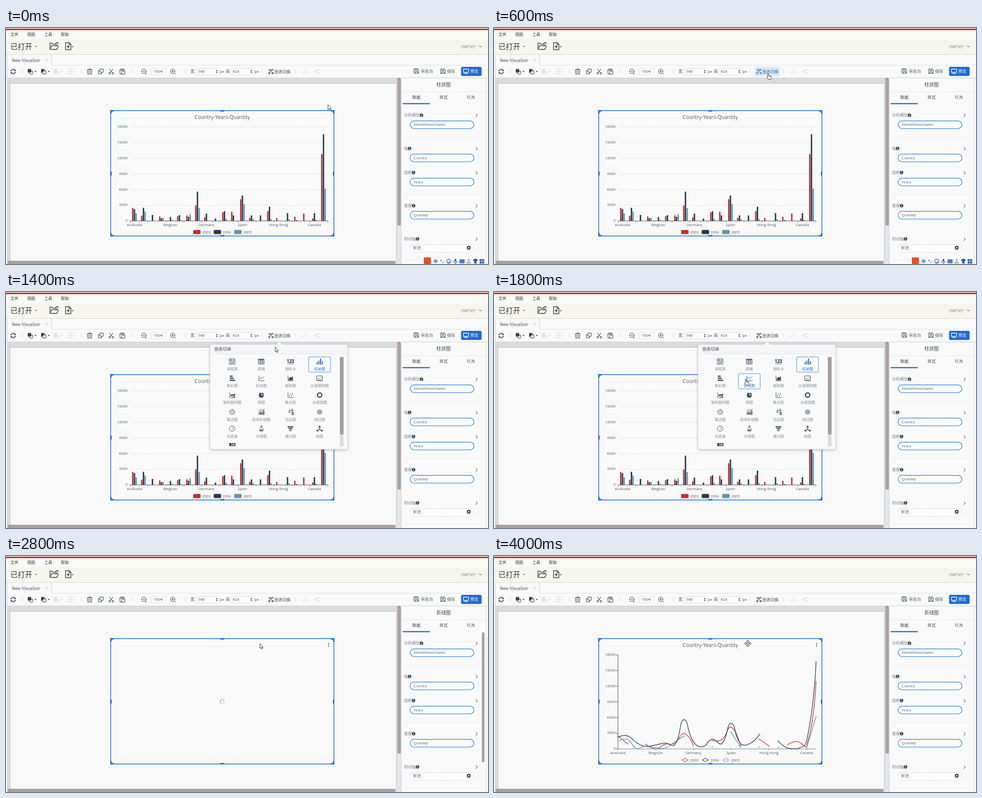
Animation of 976 by 480 pixels, one loop 4.2 s. Source, as an HTML page:

```html
<!DOCTYPE html>
<html lang="zh-CN">
<head>
<meta charset="utf-8">
<title>Visualizer</title>
<style>
html, body { margin: 0; width: 100%; height: 100%; overflow: hidden; background: #f9f9f9; }
svg { display: block; width: 100vw; height: 100vh; }
text { font-family: "Open Sans", "Noto Sans CJK SC", "Noto Sans CJK", sans-serif; white-space: pre; }
text.ar { font-family: "Liberation Sans", sans-serif; }
.ic { fill: none; stroke: #3a4149; stroke-width: 1; stroke-linejoin: round; stroke-linecap: round; }
.ic .f, .f { fill: #3a4149; stroke: none; }
.dim { opacity: .18; }
.item .ic { stroke: #4a5a6c; }
.item .f { fill: #3d4d60; stroke: none; }
.item text { fill: #858a90; }
.item rect.box { fill: none; stroke: none; }
.item.on rect.box { fill: #fbfcfd; stroke: #4a90dc; }
.item.on .ic { stroke: #1f6bc8; }
.item.on .f, .item.on text { fill: #1f6bc8; }
#sw rect { fill: none; }
#sw.on rect { fill: #dde7ef; }
#sw.on text { fill: #2277cc; }
#sw.on .ic { stroke: #2277cc; }
</style>
</head>
<body>
<svg id="stage" viewBox="0 0 976 480" preserveAspectRatio="none"></svg>
<script>
const R = (x, y, w, h, fill, more = '') =>
  `<rect x="${x}" y="${y}" width="${w}" height="${h}" fill="${fill}" ${more}/>`;
// y is the optical middle of the text
const T = (x, y, s, size = 8, fill = '#4a4f55', more = '') =>
  `<text x="${x}" y="${(y + size * .37).toFixed(2)}" font-size="${size}" fill="${fill}" ${more}>${s}</text>`;
const MID = 'text-anchor="middle"', END = 'text-anchor="end"', AR = 'class="ar"';
const P = (d, more = '') => `<path d="${d}" ${more}/>`;
const G = (id, s, more = '') => `<g id="${id}" ${more}>${s}</g>`;
const icon = (x, y, s, cls = '') => `<g class="ic ${cls}" transform="translate(${x} ${y})">${s}</g>`;
const line = (x1, y1, x2, y2, c, more = '') => P(`M${x1} ${y1}L${x2} ${y2}`, `stroke="${c}" fill="none" ${more}`);
const F = 'class="f"';
const caret = P('M-2 -1h4l-2 2.4z', F);
const circle = (r, more = '', x = 0, y = 0) => `<circle cx="${x}" cy="${y}" r="${r}" ${more}/>`;

function header() {
  let s = R(0, 0, 976, 480, '#f9f9f9') + R(0, 5, 976, 17, '#f9f9f5') + R(0, 22, 976, 31, '#f6f6ee')
    + R(0, 1.6, 976, 2.6, '#b80d14');
  [['文件', 9], ['视图', 43], ['工具', 77.5], ['帮助', 111]].forEach(([t, x]) => s += T(x, 13, t, 8.1, '#30343a'));
  s += T(9, 37.5, '已打开', 14.7, '#2e3238')
    + icon(61, 37.5, P('M-2.4 -1.2L0 1.2L2.4 -1.2'))
    + icon(97, 37, P('M-8 6.5V-6h5l2 2h6v3M-8 6.5l3-7.5H9L6 6.5zM3 -5.5L8 -7.5M5.5 -7.6H8.3V-5', 'stroke-width="1.3"'))
    + icon(126, 37, P('M-5.5 -7H2L5.5 -3.5V7H-5.5zM2 -7v3.5h3.5M-3 1H3M0 -2V4', 'stroke-width="1.3"'))
    + icon(135, 38, caret)
    + T(921, 37, 'owner', 10.7, '#555b62', 'font-weight="300"')
    + icon(961, 37.5, P('M-2.6 -1.3L0 1.3L2.6 -1.3'));
  return s + line(2, 53.8, 976, 53.8, '#d3d8dc') + line(92.5, 55, 92.5, 76, '#e2d2d2')
    + line(92, 75.8, 973, 75.8, '#dfe1e3') + line(2.5, 54, 2.5, 480, '#cfd6da')
    + T(12, 65.5, 'New Visualizer', 8.5, '#3f454c') + icon(82, 65.5, P('M-1.6 -1.6L1.6 1.6M1.6 -1.6L-1.6 1.6', 'stroke="#b9bec3"'));
}

function toolbar() {
  const y = 88.5, bar = x => line(x, 84, x, 93, '#d4d6d8');
  const layers = P('M-1 -1H5V5H-1z') + R(-5, -5, 7, 7, '', F);
  const field = (x, v) => R(x, 82.5, 47, 13, '#fbfbfb', 'stroke="#dcdfe1" rx="2"') + T(x + 4, y, v, 8, '#555', AR)
    + icon(x + 42.5, y, P('M-2 -1L0 -3.6L2 -1zM-2 1L0 3.6L2 1z', F));
  const lens = circle(4.6, '', -.5, -.5) + P('M3 3L5.5 5.5');
  const disk = P('M-4.5 -4.5H3L4.5 -3V4.5H-4.5zM-2.5 -4.5v3h4v-3M-2.5 4.5V1h5v3.5');
  const graph = P('M-3.5 -4.5h3v3h-3zM-1 -2L4 4M-1 1L-4 4.5M1.5 -4.5L-1 1', 'stroke-width=".9"')
    + circle(1.5, '', -3.6, 3.4) + circle(1.5, '', 3.6, 3.4) + circle(1.3, '', 3.2, -3.4);
  return icon(14.5, y, P('M-4.4 -1A4.5 4.5 0 0 1 3.6 -2.6M4.4 1A4.5 4.5 0 0 1 -3.6 2.6', 'stroke-width="1.5"')
      + P('M5 -5V-1H1zM-5 5V1H-1z', F))
    + [33, 152, 254, 363, 519, 586].map(bar).join('')
    + icon(49, y, layers) + icon(60, y, caret)
    + icon(76, y, P('M-5 -5H2V2H-5z', F) + P('M-1 -1H5V5H-1z', 'fill="#f9f9f9"')) + icon(87, y, caret)
    + icon(103, y, P('M-5 -5V5M-3 -4H1V-1H-3zM-3 1H5V4H-3z'), 'dim') + icon(113, y, caret, 'dim')
    + icon(130, y, P('M-5 -4H5M-3 0H3M-5 4H5'), 'dim') + icon(139, y, caret, 'dim')
    + icon(169.5, y, P('M-5 -3.5H5M-1.8 -3.5V-5.2H1.8V-3.5M-4 -3.5V5.2H4V-3.5M-1.4 -1V3M1.4 -1V3'))
    + icon(192, y, P('M-1.5 -5H5V1.5H-1.5zM-1.5 -1.5H-5V5H1.5V1.5'))
    + icon(213, y, P('M-3.5 -5L2.5 2.5M3.5 -5L-2.5 2.5') + circle(1.7, '', -3.2, 3.6) + circle(1.7, '', 3.2, 3.6))
    + icon(235.5, y, P('M-2 -4H-4.8V5H-1M2 -4H4V-1.5M-2 -5.5H2V-3H-2zM-1 -1H5V5.5H-1z'))
    + icon(279.5, y, lens + P('M-2.6 -.5H1.6')) + R(293.5, 82, 30, 13, '#fbfbfb', 'stroke="#dfe1e3" rx="2"')
    + T(308.5, y, '100%', 7.4, '#555', MID) + icon(338, y, lens + P('M-2.6 -.5H1.6M-.5 -2.6V1.6'))
    + T(373.5, y, '宽') + field(384.5, 740) + T(433, y, 'px') + T(445, y, '高') + field(454.5, 419) + T(503.5, y, 'px')
    + G('sw', R(528, 79, 50, 19, 'none', 'rx="2"') + icon(536.5, y, graph) + T(543.5, y, '图表切换', 8.2))
    + icon(604, y, P('M-3 -3L-6 0L-3 3M3 -3L6 0L3 3M1 -4L-1 4'), 'dim')
    + icon(629, y, circle(1.6, '', -3.5, 0) + circle(1.6, '', 3, -3.5) + circle(1.6, '', 3, 3.5) + P('M-2 -1L2 -3M-2 1L2 3'), 'dim')
    + icon(831, 87.5, disk) + T(840, 88, '另存为', 8.2) + icon(885, 88, disk) + T(893, 88, '保存', 8.3)
    + R(921.5, 79, 41.5, 18.5, '#1c6bd6', 'rx="2.5"')
    + icon(931.5, 88, P('M-5 -4.5H5V2.5H-5zM0 2.5V4.8M-2.8 4.8H2.8', 'stroke="#fff" stroke-width="1.3"'))
    + T(940, 88, '预览', 8.3, '#fff');
}

function workspace() {
  return R(3, 101, 797, 379, '#d9dcdf') + line(3, 101.5, 976, 101.5, '#cdd1d5')
    + R(9, 113, 781, 360, '#f8f8f8') + line(9, 112.5, 790, 112.5, '#bcbfc3') + line(8.5, 112, 8.5, 473, '#c5c8cc')
    + line(790.5, 112, 790.5, 473, '#c3c6c9')
    + R(792, 101, 8, 379, '#e3e5e7') + R(792.5, 101, 7, 301, '#aca0a0', 'rx="3"')
    + R(3, 473, 797, 7, '#e3e5e7') + R(3, 473.5, 786, 6.5, '#aca0a0', 'rx="3"');
}

function sidebar() {
  let s = R(800.5, 102, 172, 378, '#f9f9fa') + line(800.5, 102, 800.5, 480, '#d5d9dd')
    + line(972.5, 102, 972.5, 480, '#dadde0') + T(886, 115, '柱状图', 9.7, '#3c4248', MID + ' id="kind"')
    + line(801, 129.5, 972, 129.5, '#e5e7e9');
  ['数据', '样式', '行为'].forEach((t, i) => s += T(831 + i * 55.2, 141, t, 8.2, '#3a4047', MID));
  s += R(803, 152.8, 55, 2.2, '#2a63b8');
  [['分析模型', 177.5, 'SteelWheelsSales'], ['轴', 245, 'Country'], ['图例', 294, 'Years'], ['度量', 361.5, 'Quantity'], ['时间轴', 429]]
    .forEach(([t, y, v]) => {
      const x = 806 + t.length * 8 + 3.3;
      s += T(806, y, t, 8, '#7d8288') + icon(x, y, circle(3.4, F) + P('M0 -.4V1.8M0 -1.9V-1.7', 'stroke="#fff"'))
        + icon(953, y + .5, P('M-1.5 -3L1.5 0L-1.5 3', 'stroke="#7e8890" stroke-width="1.3"'))
        + R(818.5, y + 11.5, 129, 15.6, '#fcfcfd', 'rx="7.8" ' + (v ? 'stroke="#4a92d6" stroke-width="1.4"' : 'stroke="#cdd0d3" stroke-dasharray="2 1.5"'))
        + (v ? T(825, y + 19, v, 7.9, '#6b7580', AR) : T(824, y + 18, '新增', 8.1, '#70757a'));
    });
  s += icon(937, 447, circle(4, F) + P('M-2 0H2M0 -2V2', 'stroke="#fff"'));
  [222.5, 338.5, 472.5].forEach(y => s += line(806, y, 960, y, '#e6e8ea'));
  return s + G('sbar', R(963.5, 155, 5.5, 265, '#a8a4a4', 'rx="2.7"'));
}

// yearly quantities per country, null where there were no orders
const N = null, COLORS = ['#bf3133', '#263b49', '#6095ad'];
const DATA = [
  [2480, 1000, N, 850, 20, 900, 1050, 2950, 700, N, 1650, 1750, 4150, 600, N, 1850, 580, N, 800, 1430, 480, 12800],
  [2250, 2520, 1150, 480, 760, 1100, 800, 5600, 1400, 450, 1850, 1050, 4900, 1050, 1050, 2750, N, 1500, 150, 30, 1500, 16600],
  [1480, 1800, 40, 600, 180, 150, 1300, 2450, N, N, 430, N, 3200, 320, N, 350, N, 300, N, N, 230, 6150]
];
const X0 = 251, X1 = 652, BASE = 392.4;
const yOf = v => BASE - v * 191.3 / 18000;
const PLACES = ['Australia', 'Belgium', 'Germany', 'Spain', 'Hong Kong', 'Canada'];

function frame(isLine) {
  let s = T(438, 181, 'Country-Years-Quantity', 10.25, '#4b5967', MID);
  for (let v = 0; v <= 18000; v += 3000) {
    const y = yOf(v);
    s += T(246, y - .8, v, 7.5, '#555b60', END);
    if (isLine) s += line(247, y, X0, y, '#555');
    else if (v) s += line(X0, y, X1, y, '#dfe5e6', 'stroke-dasharray="5 1"');
  }
  const step = (X1 - X0) / (isLine ? 21 : 22);
  PLACES.forEach((p, i) => s += T(X0 + step * (4 * i + (isLine ? 0 : .5)), 400.5, p, 7.5, '#555b60', MID));
  for (let i = 0; i <= 22; i += isLine ? 4 : 2) s += line(X0 + step * i, BASE, X0 + step * i, BASE + 3, '#666', 'stroke-width=".8"');
  if (isLine) s += line(X0, 201, X0, BASE, '#555');
  s += line(X0, BASE, X1, BASE, isLine ? '#7a8a99' : '#555');
  COLORS.forEach((c, k) => {
    const x = 379 + k * 41.6;
    s += (isLine ? line(x, 415, x + 15, 415, c) + circle(3.7, `fill="#f9f9f9" stroke="${c}"`, x + 7.5, 415)
      : R(x, 410.7, 15, 8.6, c, 'rx="2"')) + T(x + 18, 414.8, 2003 + k, 7.5, '#555b60');
  });
  return s;
}

function bars() {
  let s = frame(false);
  const step = (X1 - X0) / 22;
  DATA.forEach((row, k) => row.forEach((v, i) => {
    if (v) s += R((X0 + step * i + 4.3 + k * 3.4).toFixed(1), yOf(v), 2.8, BASE - yOf(v), COLORS[k]);
  }));
  return s;
}

// smooth path whose tangents follow the neighbouring points
function curve(pts) {
  const ctl = (i, dir) => {
    const p = pts[i], a = pts[i - 1], b = pts[i + 1];
    if (!a || !b) return p;
    const da = Math.hypot(p[0] - a[0], p[1] - a[1]), db = Math.hypot(p[0] - b[0], p[1] - b[1]);
    const k = dir * .5 * (dir > 0 ? db : da) / (da + db);
    return [p[0] + (b[0] - a[0]) * k, Math.min(BASE, p[1] + (b[1] - a[1]) * k)];
  };
  return 'M' + pts[0] + pts.slice(1).map((p, i) => `C${ctl(i, 1)} ${ctl(i + 1, -1)} ${p}`).join('');
}

function lines() {
  let s = '';
  DATA.forEach((row, k) => {
    const runs = [[]];
    let dots = '';
    row.forEach((v, i) => {
      if (v === N) return runs.push([]);
      const p = [X0 + i * (X1 - X0) / 21, yOf(v)];
      runs[runs.length - 1].push(p);
      dots += circle(1.3, `fill="#fafafa" stroke="${COLORS[k]}" stroke-width=".7"`, ...p);
    });
    s += runs.filter(r => r.length > 1).map(r => P(curve(r), `fill="none" stroke="${COLORS[k]}" stroke-width="1.25"`)).join('') + dots;
  });
  return frame(true) + `<clipPath id="wipe"><rect id="wiper" x="248" y="190" height="210" width="0"/></clipPath>`
    + `<g clip-path="url(#wipe)">${s}</g>`;
}

function card() {
  const blue = '#1f6fe0';
  let s = R(212, 168, 452, 255, '#f9f9f9', `stroke="${blue}" stroke-width="1.5"`);
  for (const [x, dx] of [[211, 1], [665, -1]]) for (const [y, dy] of [[167, 1], [424, -1]])
    s += P(`M${x + 7 * dx} ${y + 1.5 * dy}H${x + 1.5 * dx}V${y + 7 * dy}`, `fill="none" stroke="${blue}" stroke-width="3"`);
  return s + R(434, 167, 8, 3, blue) + R(434, 421, 8, 3, blue) + R(211, 292, 3, 8, blue) + R(662, 292, 3, 8, blue);
}

function loader() {
  let s = '';
  for (let i = 0; i < 9; i++) {
    const a = i * Math.PI * 2 / 9;
    s += circle(.9, `fill="${i < 5 ? '#c2405a' : '#8d9bb0'}" opacity="${1 - i * .08}"`, 4.2 * Math.cos(a), 4.2 * Math.sin(a));
  }
  return s;
}

const AXES = 'M-5 -5V5H6';
const SHAPES = [
  P('M-5.5 -5.5H5.5V5.5H-5.5zM-5.5 -2.5H5.5M-2.5 -5.5V5.5M0 0H3V3H0z'),
  P('M-5.5 -5H5.5V5H-5.5zM-5.5 -1.5H5.5M-5.5 1.8H5.5M-1.8 -5V5M1.8 -5V5') + P('M-5.5 -5H5.5V-3.3H-5.5z', F),
  T(0, -1, '123', 8.6, '#858a90', MID) + P('M-6 5H6', 'stroke-width=".7"'),
  P('M-6 1H-4V6H-6zM-2.5 -2H-.5V6H-2.5zM1 -6H3V6H1zM4.5 -1H6.5V6H4.5z', F),
  P('M-5 -5.5H1V-3H-5zM-5 -1.3H3V1.2H-5zM-5 3H6V5.5H-5z', F),
  P(AXES + 'M-4 2L-1 -1L2 0L6 -4'),
  P(AXES) + P('M-3.5 3.8V0L0 -3L2 -1L5 -5V3.8z', F),
  P('M-5.5 -5H5.5V5H-5.5zM-4 2L-1 -1L1 1L4 -2M-4 3.5H4'),
  P(AXES) + P('M-3.5 0L0 -2L3 -1L6 -4V0L3 2L0 1L-3.5 3zM-3 4L6 2V4z', F),
  circle(5.3, F) + P('M0 -5V0H5', 'stroke="#f9f9f9"'),
  P(AXES) + circle(1, F, -2, 1.5) + circle(1, F, 0, -3) + circle(1, F, 2, 1) + circle(1, F, 4, -2),
  circle(4.4, 'stroke-width="2.6" stroke-dasharray="8 1.2"'),
  P('M0 -5.5L5.6 -1.3L3.5 5H-3.5L-5.6 -1.3zM0 -2.5L2.5 -.5L1.5 2.5H-1.5L-2.5 -.5zM0 -5.5V-2.5M5.6 -1.3L2.5 -.5M-5.6 -1.3L-2.5 -.5', 'stroke-width=".8"'),
  P('M-5 1H-3V6H-5zM-2 -1H0V6H-2zM1 0H3V6H1zM4 -3H6V6H4z', F) + P('M-5 -2L-1 -4L2 -3L6 -6'),
  T(-4, -1, 'C', 8, '', F + ' font-weight="700"') + T(1, -3, 'A', 7, '', F + ' font-weight="700"') + T(2, 3.5, 'B', 8, '', F + ' font-weight="700"'),
  circle(4.8, 'stroke-dasharray="6 1"') + circle(2.2, 'stroke-width="1.4"'),
  P('M-3.5 4.6A5.6 5.6 0 1 1 3.5 4.6M0 1.5L2.5 -2M-2 5H2'),
  P('M-1.5 -5.5H1.5M-1 -5.5V-1.5A3.9 3.9 0 1 0 1 -1.5V-5.5') + P('M-3.4 2H3.4A3.5 3.5 0 0 1 -3.4 2z', F),
  P('M-6 -5H6V-3H-6zM-4.5 -2H4.5V0H-4.5zM-3 1H3V2.6H-3zM-1.8 3.6H1.8V5.2H-1.8z', F),
  circle(1.9, F, 0, -4) + circle(1.9, F, -4.3, 4) + circle(1.9, F, 4.3, 4) + P('M0 -4V1L-4 4M0 1L4 4', 'stroke-width="1.5"')
];
const KINDS = '透视表 表格 指标卡 柱状图 条形图 折线图 面积图 比值堆积图 堆积面积图 饼图 散点图 分组饼图 雷达图 柱状折线图 词云图 旭日图 仪表盘 水球图 漏斗图 树图'.split(' ');

function popover() {
  let s = P('M417 106.5H547L553 100.5L559 106.5H688a4 4 0 0 1 4 4V316a4 4 0 0 1 -4 4H417a4 4 0 0 1 -4 -4V110.5a4 4 0 0 1 4 -4z',
    'fill="#f9f9f9" stroke="#cfd2d5" filter="url(#soft)"')
    + R(413.5, 107, 278, 18.5, '#f5f6f7', 'rx="3"') + line(413, 125.8, 692, 125.8, '#e2e4e6') + T(422, 116, '图表切换', 8.5, '#454b52');
  KINDS.forEach((k, i) => {
    const x = 458 + i % 4 * 59, y = 141.5 + (i >> 2) * 34.1;
    s += `<g class="item${i === 3 ? ' on' : ''}"${i === 5 ? ' id="pick"' : ''}>`
      + R(x - 22, y - 9.5, 44, 31, 'none', 'class="box" rx="2"')
      + icon(x, y, SHAPES[i]) + T(x, y + 15, k, 7.4, '#858a90', MID) + '</g>';
  });
  return s + P('M452 307H457V313.5H452zM458 307H461V310H458zM458 311H461V313.5H458zM462 307H464.5V313.5H462z', 'fill="#3d4d60"')
    + R(676, 132, 7.5, 182, '#e0dbdb') + R(676, 132, 7.5, 158, '#a69e9e', 'rx="2"');
}

function tray() {
  const b = '#2c62b4', pen = `fill="none" stroke="${b}" stroke-width="1.2"`;
  return R(845, 467, 131, 13, '#f9f9fa') + R(846, 466.5, 14.5, 13.5, '#e8501e', 'rx="2"') + T(865.5, 474.5, '中', 9, b, 'font-weight="700"')
    + circle(1.3, `fill="${b}"`, 881, 473) + P('M885 474.5q1 1.5 -1 3', pen)
    + circle(4.4, pen, 896.5, 474.5) + P('M894 475.5q2.5 3 5 0M895 472.6v1M898 472.6v1', pen)
    + R(908.3, 469.5, 3.6, 6, b, 'rx="1.8"') + P('M906.5 474q0 3.5 3.6 3.5t3.6 -3.5M910.1 477.5v2', pen)
    + R(918.5, 470.5, 10, 8, b, 'rx="1"') + P('M920 473h7M920 476h7', 'stroke="#fff" stroke-dasharray="1 1"')
    + circle(2.2, 'fill="#a9b0b8"', 937, 472) + P('M932.5 479q0 -4 4.5 -4t4.5 4z', 'fill="#a9b0b8"')
    + P('M946 471l3 -1.5h3l3 1.5v3h-2v5h-5v-5h-2z', `fill="${b}"`)
    + [[959, 470], [964, 470], [959, 475], [964, 475]].map(([x, y]) => R(x, y, 4.2, 4.2, b)).join('');
}

const OUT = 'fill="#fff" stroke="#333" stroke-width=".9" stroke-linejoin="round"';
const pointers = {
  arrow: P('M0 0V10L2.3 7.9L3.8 11.3L5.3 10.6L3.9 7.4H6.8z', OUT),
  hand: P('M1.2 .8q1 -1 1.8 0V5l4.4 1q1.4 .5 1.2 2l-.9 4.5H2.8L-.7 8.2q-.2 -1.6 1.9 -.5z', OUT) + P('M4.6 5.5V7.5M6.4 6V8', 'stroke="#333" stroke-width=".7"'),
  move: P('M0 -7L2.5 -4.2H1V-1H4.2V-2.5L7 0L4.2 2.5V1H1V4.2H2.5L0 7L-2.5 4.2H-1V1H-4.2V2.5L-7 0L-4.2 -2.5V-1H-1V-4.2H-2.5z', OUT)
};

const $ = id => document.getElementById(id);
$('stage').innerHTML = '<defs><filter id="soft" x="-5%" y="-5%" width="110%" height="112%"><feDropShadow dx="0" dy="1.5" stdDeviation="2.2" flood-color="#000" flood-opacity=".22"/></filter></defs>'
  + header() + toolbar() + workspace() + sidebar() + card()
  + G('bars', bars()) + G('lines', lines()) + G('loader', loader())
  + G('dots', [178, 181, 184].map(y => circle(1, 'fill="#444"', 653, y)).join(''))
  + G('pop', popover()) + G('tray', tray())
  + Object.keys(pointers).map(k => G(k, pointers[k])).join('');

const STEP = 200, LOOP = 4200;
// step from which the pointer holds a place
const PATH = [[0, 652, 156], [1, 636, 140], [2, 588, 106], [3, 553, 92], [7, 545, 112], [8, 522, 152], [9, 508, 177], [12, 514, 178]];
const show = (id, on) => $(id).style.display = on ? '' : 'none';

function pose(n) {
  const [, x, y] = PATH.filter(p => p[0] <= n).pop();
  const kind = n >= 15 ? 'move' : (n >= 3 && n < 7) || (n >= 9 && n < 12) ? 'hand' : 'arrow';
  for (const k in pointers) show(k, k === kind);
  $(kind).setAttribute('transform', `translate(${x} ${y})`);
  $('sw').setAttribute('class', n >= 3 && n < 7 ? 'on' : '');
  $('pick').setAttribute('class', n >= 9 && n < 13 ? 'item on' : 'item');
  show('tray', n < 5);
  show('pop', n >= 5 && n < 13);
  $('pop').style.opacity = n === 5 ? .86 : n === 12 ? .3 : 1;
  show('bars', n < 12);
  show('loader', n >= 12 && n < 15);
  $('loader').setAttribute('transform', `translate(438 296) rotate(${150 + (n - 14) * 80})`);
  show('lines', n >= 15);
  $('wiper').setAttribute('width', n === 15 ? 70 : n === 16 ? 310 : 410);
  show('dots', n >= 12);
  show('sbar', n >= 12 && n < 16);
  $('kind').textContent = n >= 12 ? '折线图' : '柱状图';
}

let last = -1;
function tick() {
  const n = Math.floor(performance.now() % LOOP / STEP);
  if (n !== last) pose(last = n);
  requestAnimationFrame(tick);
}
tick();
</script>
</body>
</html>
```
